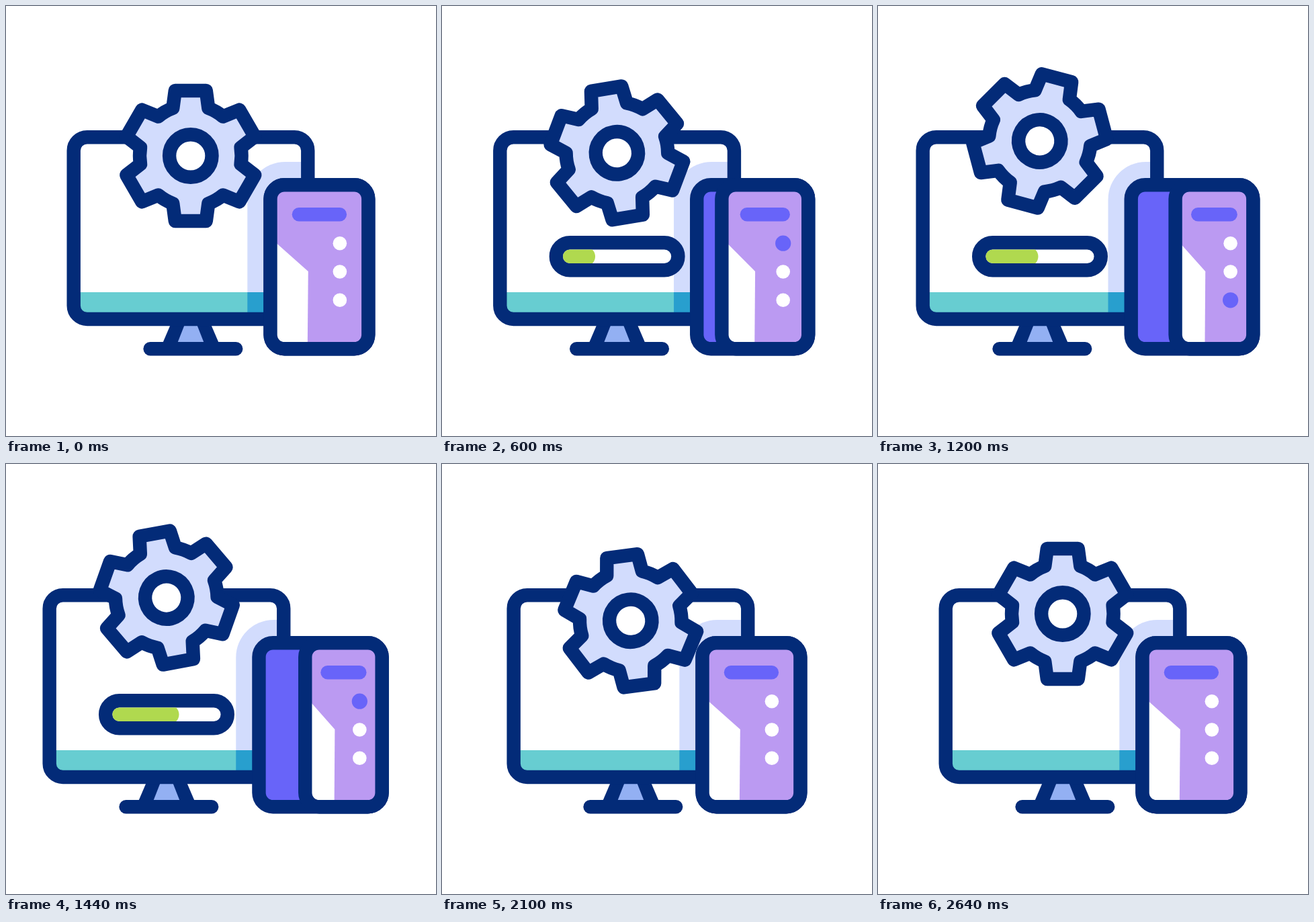
An HTML page with a canvas for the animation above (3 s loop, 640 px wide and 640 px high).

```html
<!DOCTYPE html>
<html lang="en">
<head>
<meta charset="utf-8">
<title>Devices</title>
<style>
  html, body { margin: 0; width: 100%; height: 100%; overflow: hidden; background: #fff; }
  canvas { display: block; width: 640px; height: 640px; }
</style>
</head>
<body>
<canvas id="stage"></canvas>
<script>
const LOOP = 3000, LINE = 20.4;
const NAVY = '#032b78', PALE = '#d2dcfd', TEAL = '#67cdd1', BLUE = '#289fce',
      NECK = '#93b0f3', LILAC = '#bb9af2', INDIGO = '#6864f9', LIME = '#b0d94f', WHITE = '#fff';

const canvas = document.getElementById('stage');
const ctx = canvas.getContext('2d');
const dpr = window.devicePixelRatio || 1;
canvas.width = canvas.height = 640 * dpr;

const clamp = v => Math.min(1, Math.max(0, v));

// Monotone cubic curve through [time, value] keys
function curve(keys) {
  const rise = i => (keys[i + 1][1] - keys[i][1]) / (keys[i + 1][0] - keys[i][0]);
  const slope = keys.map((_, i) => {
    if (i === 0 || i === keys.length - 1) return 0;
    const a = rise(i - 1), b = rise(i);
    return a * b > 0 ? 2 * a * b / (a + b) : 0;
  });
  return t => {
    if (t <= keys[0][0]) return keys[0][1];
    const i = keys.findIndex(k => k[0] >= t) - 1;
    if (i < 0) return keys[keys.length - 1][1];
    const [t0, v0] = keys[i], [t1, v1] = keys[i + 1];
    const h = t1 - t0, u = (t - t0) / h, w = 1 - u;
    return v0 * (1 + 2 * u) * w * w + v1 * u * u * (3 - 2 * u)
      + h * u * w * (slope[i] * w - slope[i + 1] * u);
  };
}

const turn = curve([[400, 0], [600, .525], [740, .685], [880, .797], [1200, .934],
  [1740, 1], [1760, 1], [1840, .778], [2030, 0]]);
const sway = curve([[200, 0], [400, 1], [2030, 1], [2100, .55], [2250, -1.25], [2380, -.55], [2640, 0]]);
const spin = curve([[200, 0], [440, -12], [600, -9.4], [880, 13.2], [1200, 74.9],
  [1740, 144.2], [2100, 172.5], [2500, 180]]);
const barSize = curve([[380, 0], [570, 1], [1800, 1], [2000, 0]]);
const load = curve([[400, 46], [600, 48], [880, 53], [1200, 78], [1740, 126], [2000, 148]]);

function paint(fill, stroke) {
  if (fill) { ctx.fillStyle = fill; ctx.fill(); }
  if (stroke) { ctx.strokeStyle = stroke; ctx.stroke(); }
}
function box(x0, y0, x1, y1, r, fill, stroke) {
  ctx.beginPath();
  ctx.roundRect(x0, y0, x1 - x0, y1 - y0, r);
  paint(fill, stroke);
}
function poly(points, fill) {
  ctx.beginPath();
  points.forEach(p => ctx.lineTo(...p));
  ctx.closePath();
  paint(fill);
}
function disc(x, y, r, fill, stroke) {
  ctx.beginPath();
  ctx.arc(x, y, r, 0, 2 * Math.PI);
  paint(fill, stroke);
}
function bar(x0, x1, y, color) {
  ctx.beginPath();
  ctx.moveTo(x0, y);
  ctx.lineTo(x1, y);
  paint(null, color);
}

function monitor(dx, shade) {
  const x0 = 100.7 + dx, x1 = 449.3 + dx, mid = 275 + dx;
  poly([[mid - 30, 474], [mid + 30, 474], [mid + 42, 502], [mid - 42, 502]], NAVY);
  poly([[mid - 9, 474], [mid + 9, 474], [mid + 20, 502], [mid - 20, 502]], NECK);
  bar(214.6 + dx, 342.2 + dx, 510.3, NAVY);

  ctx.save();
  box(x0, 195.2, x1, 466, 20, WHITE);
  ctx.clip();
  box(shade, 232, shade + 300, 640, 56, PALE);
  box(x0, 426, x1, 466, 0, TEAL);
  box(shade, 426, x1, 466, 0, BLUE);
  ctx.restore();
  box(x0, 195.2, x1, 466, 20, null, NAVY);
}

function progress(x, t) {
  const size = barSize(t);
  if (size < .01) return;
  ctx.save();
  ctx.translate(x, 372.8);
  ctx.scale(size, size);
  box(-90.8, -20.5, 90.8, 20.5, 20.5, WHITE, NAVY);
  box(-80.6, -10.3, 80.6, 10.3, 10.3);
  ctx.clip();
  const end = load(t) - 80.6;
  ctx.beginPath();
  ctx.moveTo(-81, -11);
  ctx.lineTo(end - 5, -11);
  ctx.bezierCurveTo(end + 1.7, -5, end + 1.7, 5, end - 5, 11);
  ctx.lineTo(-81, 11);
  paint(LIME);
  ctx.restore();
}

function gear(x, y, angle) {
  ctx.save();
  ctx.translate(x, y);
  ctx.rotate(angle * Math.PI / 180);
  const base = Math.atan2(26.5, 71), r = Math.hypot(26.5, 71);
  ctx.beginPath();
  for (let i = 0; i < 6; i++) {
    ctx.lineTo(-26.5, -71);
    ctx.lineTo(-23, -97);
    ctx.lineTo(23, -97);
    ctx.lineTo(26.5, -71);
    ctx.arc(0, 0, r, base - Math.PI / 2, Math.PI / 3 - base - Math.PI / 2);
    ctx.rotate(Math.PI / 3);
  }
  ctx.closePath();
  paint(PALE, NAVY);
  disc(0, 0, 31.7, WHITE, NAVY);
  ctx.restore();
}

function phone(left, width, depth, t) {
  const right = left + width, at = u => left + u * width;
  const top = 266.2, bottom = 510.3;
  box(left - depth, top, right, bottom, 21, INDIGO, NAVY);

  ctx.save();
  box(left, top, right, bottom, 21, LILAC);
  ctx.clip();
  poly([[left, 345], [at(.386), 395], [at(.379), bottom], [left, bottom]], WHITE);
  ctx.restore();
  box(left, top, right, bottom, 21, null, NAVY);

  bar(at(.291), at(.709), 310.2, INDIGO);
  for (let i = 0; i < 3; i++) {
    const y = 353.2 + 42.3 * i;
    disc(at(.709), y, 10.3, WHITE);
    for (const start of [518, 1238]) {
      const age = t - start - 240 * i;
      ctx.globalAlpha = clamp(age / 60 + .5) * clamp((240 - age) / 60 + .5);
      disc(at(.709), y, 11.6, INDIGO);
    }
    ctx.globalAlpha = 1;
  }
}

function draw(t) {
  const q = turn(t), k = sway(t);
  const dx = 11 * k - 48.2 * q;
  const width = 145.8 - 32.2 * q, depth = 70.5 * q;
  const left = 466.4 - dx - width / 2;

  ctx.setTransform(dpr, 0, 0, dpr, 0, 0);
  ctx.fillStyle = WHITE;
  ctx.fillRect(0, 0, 640, 640);
  ctx.lineWidth = LINE;
  ctx.lineCap = ctx.lineJoin = 'round';

  monitor(dx, left - depth - 34.2);
  progress(275 + dx, t);
  gear(274.8 + dx, 223 + 19 * k - 44 * q, spin(t));
  phone(left, width, depth, t);
}

const begin = performance.now();
function tick() {
  draw((performance.now() - begin) % LOOP);
  requestAnimationFrame(tick);
}
tick();
</script>
</body>
</html>
```
